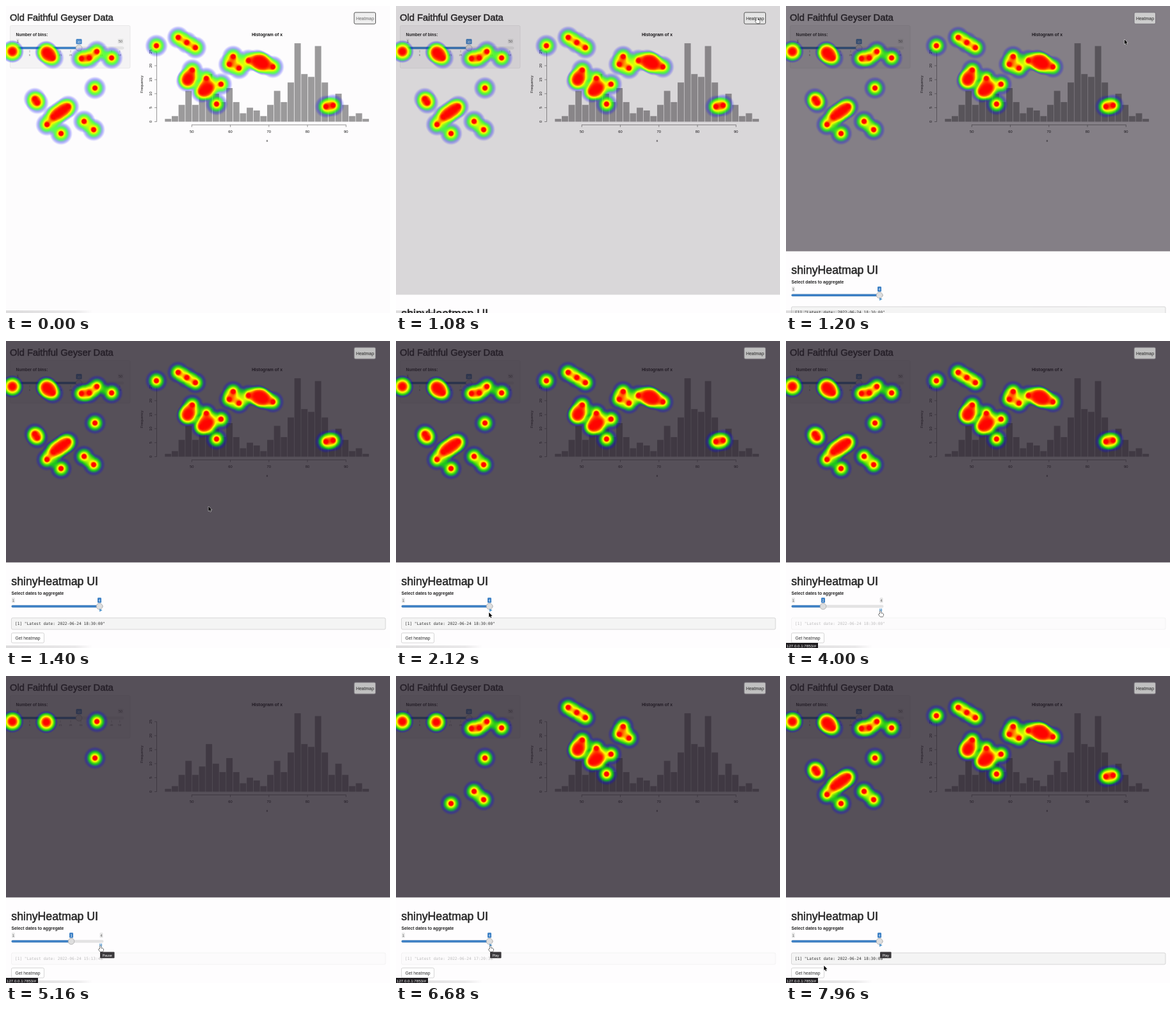
These frames come from a looping animation (600x479 px, 8 s). An HTML page with a canvas:

```html
<!DOCTYPE html>
<html lang="en">
<head>
<meta charset="utf-8">
<title>Heatmap over a histogram</title>
<style>
  html, body { margin: 0; width: 100%; height: 100%; overflow: hidden; background: #fdfcfd; }
  canvas { display: block; }
</style>
</head>
<body>
<canvas id="stage" width="600" height="479"></canvas>
<script>
const W = 600, H = 479, LOOP = 8000;
const g = document.getElementById('stage').getContext('2d');
const SANS = '"Liberation Sans", Arial, sans-serif';
const MONO = '"DejaVu Sans Mono", monospace';
const BLUE = '#3b7fc4';

// Timeline, in ms
const OPEN = 973, PLAY = 2560, STEP = 1010, STOP = PLAY + 4 * STEP;
const ANSWER = 5000, ANSWER_GAP = 680, READY = ANSWER + 3 * ANSWER_GAP;

const clamp = v => Math.max(0, Math.min(1, v));
const lerp = (a, b, p) => a + (b - a) * p;
const ramp = (t, start, len) => 0.5 - Math.cos(Math.PI * clamp((t - start) / len)) / 2;

function text(str, x, y, size, { color = '#333', bold = 0, align = 'left', font = SANS, heavy = 0 } = {}) {
  g.font = `${bold ? 'bold ' : ''}${size}px ${font}`;
  g.textAlign = align;
  g.fillStyle = g.strokeStyle = color;
  g.fillText(str, x, y);
  if (heavy) { g.lineWidth = heavy; g.strokeText(str, x, y); }
}

function box(x, y, w, h, r, fill, stroke, line = 0.7) {
  g.beginPath();
  g.roundRect(x, y, w, h, r);
  if (fill) { g.fillStyle = fill; g.fill(); }
  if (stroke) { g.strokeStyle = stroke; g.lineWidth = line; g.stroke(); }
}

function line(x0, y0, x1, y1, color = '#555') {
  g.strokeStyle = color;
  g.lineWidth = 0.6;
  g.beginPath();
  g.moveTo(x0, y0);
  g.lineTo(x1, y1);
  g.stroke();
}

const axisText = { color: '#111', align: 'center' };

function vertical(str, x, y, size) {
  g.save();
  g.translate(x, y);
  g.rotate(-Math.PI / 2);
  text(str, 0, 0, size, axisText);
  g.restore();
}

function tag(str, x, y, w, active) {
  box(x - w / 2, y - 4, w, 8, 1.2, active ? BLUE : '#e6e6e6');
  text(str, x, y + 2, 5.2, { color: active ? '#fff' : '#555', align: 'center' });
}

function slider(x0, x1, at, y) {
  box(x0, y - 1.8, x1 - x0, 3.6, 1.8, '#e4e4e4', '#d0d0d0', 0.4);
  box(x0, y - 1.8, at - x0, 3.6, 1.8, BLUE);
  box(at - 4.8, y - 4.8, 9.6, 9.6, 4.8, '#dedede', '#aaa', 0.8);
}

// Clicks per date: runs of n soft dots from (x, y) along (dx, dy)
const RUNS = [
  [[10, 71, 0, 0, 2], [63, 72, 0, 0, 2], [142, 71], [139, 128]],
  [[118, 82, 12, -1, 2], [165, 81], [269, 49, 27, 16, 3], [349, 91, 15, 6, 2], [355, 79]],
  [[122, 180, 15, 13, 2], [86, 199], [283, 117, 3, -5, 3], [291, 100],
   [306, 134, 12, -7, 4], [313, 113], [336, 122, -7, 31, 2]],
  [[67, 76, 6, 5, 2], [45, 145, 4, 6, 2], [64, 185], [74, 173, 23, -16, 5], [235, 62],
   [379, 85, 38, 10, 2], [392, 85, 12, 6, 5], [500, 157, 11, -2, 2]]
];

function layer(w, h) {
  const c = document.createElement('canvas');
  c.width = w;
  c.height = h;
  return c;
}

function palette() {
  const p = layer(256, 1).getContext('2d');
  const fill = p.createLinearGradient(0, 0, 256, 0);
  ['#00f', '#0f0', '#ff0', '#f00'].forEach((c, i) => fill.addColorStop(Math.min(1, 0.25 + 0.3 * i), c));
  p.fillStyle = fill;
  p.fillRect(0, 0, 256, 1);
  return p.getImageData(0, 0, 256, 1).data;
}

function heat(runs, colors) {
  const c = layer(W, 230), p = c.getContext('2d');
  for (const [x0, y0, dx = 0, dy = 0, n = 1] of runs) {
    for (let i = 0; i < n; i++) {
      const k = n > 1 ? i / (n - 1) : 0, x = x0 + dx * k, y = y0 + dy * k;
      const dot = p.createRadialGradient(x, y, 3, x, y, 18);
      dot.addColorStop(0, 'rgba(0,0,0,1)');
      dot.addColorStop(1, 'rgba(0,0,0,0)');
      p.fillStyle = dot;
      p.fillRect(x - 18, y - 18, 36, 36);
    }
  }
  const img = p.getImageData(0, 0, W, 230), d = img.data;
  for (let i = 0; i < d.length; i += 4) {
    const a = d[i + 3];
    for (let k = 0; k < 3; k++) d[i + k] = colors[a * 4 + k];
    d[i + 3] = Math.min(255, a * 1.2);
  }
  p.putImageData(img, 0, 0);
  return c;
}

const colors = palette();
const HEAT = RUNS.map((_, i) => heat(RUNS.slice(0, i + 1).flat(), colors));

// Two humps with a ripple, thin at both ends
function count(i) {
  const hump = (mid, width, top) => top * Math.exp(-(((i - mid) / width) ** 2));
  const ripple = 1 + 0.45 * Math.cos(2 * Math.PI * (i - 6) / 3.23);
  const edge = Math.min(1, i + 0.15, 29.4 - i);
  return Math.round((2.3 + hump(6.3, 4.3, 9.5) + hump(20.4, 3.9, 19.7)) * ripple * edge);
}

function histogram() {
  const base = 180.5, unit = 4.37, bw = 10.65;
  g.fillStyle = '#9b9a9b';
  for (let i = 0; i < 30; i++) {
    const h = count(i) * unit;
    g.fillRect(248.3 + i * bw, base - h, bw - 0.7, h);
  }
  text('Histogram of x', 408, 46.5, 6.9, { ...axisText, bold: 1 });
  line(290, 185.5, 531.5, 185.5);
  line(235.5, base, 235.5, base - 25 * unit);
  for (let i = 0; i < 5; i++) {
    const x = 290.3 + i * 60.25;
    line(x, 185.5, x, 189);
    text(50 + i * 10, x, 198.3, 5.8, axisText);
  }
  for (let n = 0; n <= 25; n += 5) {
    const y = base - n * unit;
    line(232, y, 235.5, y);
    vertical(n, 228, y, 5.8);
  }
  text('x', 408, 212, 5.8, axisText);
  vertical('Frequency', 213.5, 122, 5.8);
}

function page() {
  g.fillStyle = '#fdfcfd';
  g.fillRect(0, 0, W, H);
  text('Old Faithful Geyser Data', 6, 23, 14.7, { heavy: 0.5, color: '#262626' });
  box(6.5, 30.5, 187.5, 66.5, 2, '#f4f3f4', '#e3e3e3');
  text('Number of bins:', 15.5, 46.8, 6.5, { bold: 1, color: '#222' });
  tag('1', 18.5, 55, 5);
  tag('50', 179, 55, 9);
  slider(16, 184, 114, 65.5);
  tag('30', 114, 55.5, 9, true);
  for (let v = 1; v <= 51; v += 5) {
    const n = Math.min(v, 50), x = 21 + 3.2 * (n - 1);
    line(x, 69, x, 72.5, '#999');
    text(n, x, 77.5, 4.4, { color: '#777', align: 'center' });
  }
  histogram();
}

function sliderValue(t) {
  let v = 4;
  for (let i = 0; i < 4; i++) v = lerp(v, i + 1, ramp(t, PLAY + i * STEP, 200));
  return v;
}

// Which date's result is on show; results lag behind the slider
const answer = t => t < ANSWER ? 3 : Math.min(3, Math.floor((t - ANSWER) / ANSWER_GAP));
const TIMES = ['15:13:48', '16:02:11', '17:20:36', '18:30:00'];

function panel(t, top) {
  g.save();
  g.translate(0, top - 345.5);
  g.fillStyle = '#fefdfe';
  g.fillRect(0, 345.5, W, 140);
  text('shinyHeatmap UI', 8.3, 381, 17.7, { heavy: 0.55, color: '#262626' });
  text('Select dates to aggregate', 8.5, 396, 6.75, { bold: 1, color: '#222' });

  const v = sliderValue(t), x = 14 + 44 * (v - 1);
  if (v > 1.15) tag('1', 11.5, 404.5, 5);
  if (v < 3.85) tag('4', 149, 404.5, 5);
  slider(8.5, 152, x, 414);
  tag(Math.round(v), x, 404.5, 6, true);

  const playing = t >= PLAY && t < STOP;
  g.fillStyle = '#5a9bd0';
  g.fill(new Path2D(playing
    ? 'M146.2 417.6h1.4v4.6h-1.4zM148.6 417.6h1.4v4.6h-1.4z'
    : 'M146 417.5l4.6 2.5-4.6 2.5z'));

  g.globalAlpha = 1 - 0.7 * (ramp(t, PLAY, 250) - ramp(t, READY, 200));
  box(8.5, 432, 584.5, 18, 2, '#f4f4f4', '#c8c8c8');
  text(`[1] "Latest date: 2022-06-24 ${TIMES[answer(t)]}"`, 14, 443.2, 6.16, { font: MONO });
  g.globalAlpha = 1;

  box(8.5, 455.5, 51, 15.5, 2, '#fff', '#c4c4c4');
  text('Get heatmap', 14.5, 465.8, 6.75);
  g.restore();
}

function tooltip(str, w) {
  box(147, 430.5, w, 9.8, 1, '#3a383b');
  text(str, 147 + w / 2, 437.5, 5.3, { color: '#fff', align: 'center' });
}

function statusBar(t) {
  const shade = g.createLinearGradient(0, 0, 135, 0);
  shade.addColorStop(0, 'rgba(0,0,0,.13)');
  shade.addColorStop(0.8, 'rgba(0,0,0,.08)');
  shade.addColorStop(1, 'rgba(0,0,0,0)');
  g.fillStyle = shade;
  g.fillRect(0, 475, 135, 4);
  g.globalAlpha = ramp(t, PLAY, 160);
  g.fillStyle = '#1d1b1e';
  g.fillRect(0, 471, 50, 8);
  text('127.0.0.1:7853/#', 1, 477.6, 6.15, { color: '#fff' });
  g.globalAlpha = 1;
}

// Pointer moves: start, duration, target
const MOVES = [[0, 760, 564, 18], [1100, 540, 144, 425], [1900, 540, 147.5, 421], [7000, 1000, 59, 452]];

function pointer(t) {
  let x = 330, y = 490;
  for (const [at, len, toX, toY] of MOVES) {
    const p = ramp(t, at, len);
    x = lerp(x, toX, p);
    y = lerp(y, toY, p);
  }
  const hand = (t > 720 && t < 1130) || (t > 2400 && t < 7200);
  g.save();
  g.translate(x, y);
  g.lineJoin = 'round';
  const shape = new Path2D(hand
    ? 'M-1 .8Q0-.8 1 .8V3.4L4 4.2Q4.8 4.6 4.6 6L4 9H-.4L-3 5.6Q-2.6 4.4-1 5.4Z'
    : 'M0 0V7.4L1.7 5.9 2.8 8.5 4 8 2.9 5.4H5.2Z');
  g.fillStyle = hand ? '#fff' : '#000';
  g.strokeStyle = hand ? '#000' : '#fff';
  g.stroke(shape);
  g.fill(shape);
  g.restore();
}

function draw(t) {
  const open = ramp(t, OPEN, 353);
  page();
  g.fillStyle = `rgba(37,29,41,${0.77 * open})`;
  g.fillRect(0, 0, W, H);
  const shade = Math.round(lerp(239, 192, open));
  box(544, 10, 33.5, 18, 2, `rgb(${shade},${shade},${shade})`, open < 0.5 ? '#555' : '#77727a', 1);
  text('Heatmap', 561, 21.5, 6.9, { align: 'center', color: open > 0 ? '#222' : '#666' });
  g.drawImage(HEAT[answer(t)], 0, 0);
  if (open > 0) panel(t, lerp(H, 345.5, open));
  statusBar(t);
  if (t >= STOP) tooltip('Play', 17.5);
  else if (t >= 4240) tooltip('Pause', 22.5);
  g.lineWidth = 1;
  pointer(t);
}

const start = performance.now();
function tick() {
  draw((performance.now() - start) % LOOP);
  requestAnimationFrame(tick);
}
tick();
</script>
</body>
</html>
```
